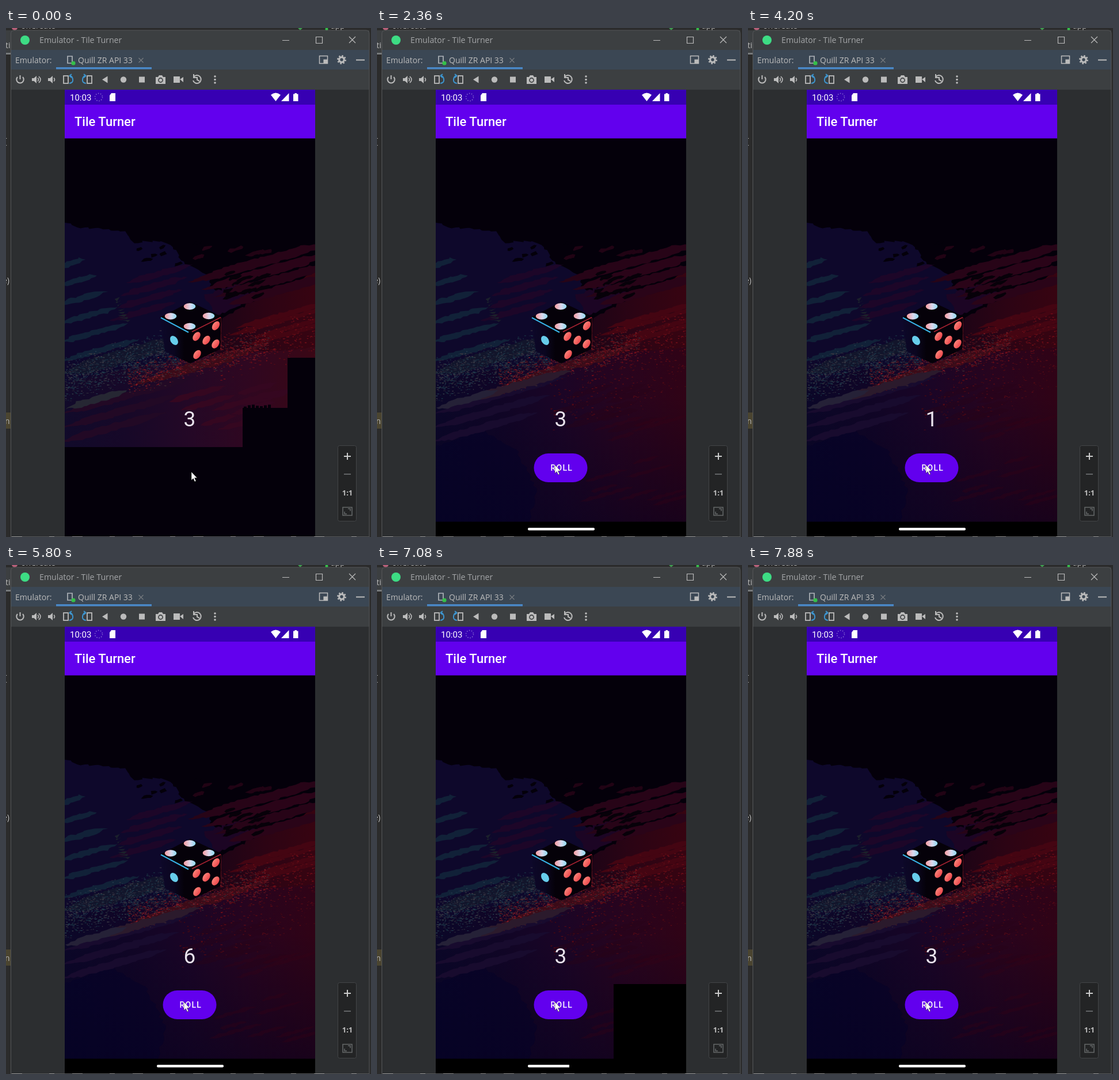
Recreate the animation shown at these times as an HTML page with a canvas. Size 634 by 883 pixels, loop 8 s.

```html
<!DOCTYPE html>
<html lang="en">
<head>
<meta charset="utf-8">
<title>Emulator</title>
<style>
  html, body { margin: 0; width: 100%; height: 100%; overflow: hidden; background: #2b2b2b; }
  canvas, svg { position: absolute; left: 0; top: 0; display: block; }
  canvas { left: 102px; top: 191px; }
  .ui { font-family: "Open Sans", "Noto Sans", sans-serif; font-size: 14px; fill: #bbb; }
  .app { font-family: Roboto, sans-serif; fill: #fff; }
  .digit { font-size: 37px; text-anchor: middle; fill: #e9e3ec; }
  .timed { animation: 8s step-end infinite; }
  .early { animation-name: early; }
  .late { animation-name: late; }
  .stale { animation-name: stale; }
  .trail { animation-name: trail; }
  .cursor { animation-name: cursor; }
  .three { animation-name: three; }
  .six { animation-name: six; }
  .one { animation-name: one; }
  .two { animation-name: two; }
  @keyframes early { 0% { opacity: 1 } 29.5%, 100% { opacity: 0 } }
  @keyframes late { 0% { opacity: 0 } 29.5%, 100% { opacity: 1 } }
  @keyframes stale { 0%, 90.25%, 100% { opacity: 0 } 88.5% { opacity: 1 } }
  @keyframes trail { 0%, 29.5%, 100% { opacity: 0 } 10.5% { opacity: 1 } }
  @keyframes three { 0%, 79.375%, 98.5%, 100% { opacity: 1 } 42.5%, 90.25% { opacity: 0 } }
  @keyframes six { 0%, 52.5%, 79.375%, 100% { opacity: 0 } 42.5%, 72.5% { opacity: 1 } }
  @keyframes one { 0%, 72.5%, 100% { opacity: 0 } 52.5% { opacity: 1 } }
  @keyframes two { 0%, 98.5%, 100% { opacity: 0 } 90.25% { opacity: 1 } }
  @keyframes cursor {
    0% { transform: translate(322px, 770px) }
    7.125% { transform: translate(318px, 767px) }
    8.625% { transform: translate(314px, 763px) }
    10.5% { transform: translate(309px, 760px) }
    29.5%, 100% { transform: translate(309px, 758px) }
  }
</style>
</head>
<body>
<canvas id="lateScene" width="435" height="692"></canvas>
<canvas id="earlyScene" class="timed early" width="435" height="692"></canvas>

<svg width="634" height="883" viewBox="0 0 634 883">
  <defs>
    <linearGradient id="pip"><stop offset=".1" stop-color="#f3a5ad"/><stop offset=".55" stop-color="#d9d9ee"/><stop offset="1" stop-color="#8edcf6"/></linearGradient>
    <linearGradient id="redPip"><stop offset="0" stop-color="#ff8278"/><stop offset="1" stop-color="#e9474c"/></linearGradient>
    <linearGradient id="leftFace"><stop offset="0" stop-color="#0d0829"/><stop offset=".45" stop-color="#0b0620"/><stop offset=".8" stop-color="#050109"/></linearGradient>
    <ellipse id="topPip" rx="10.3" ry="5.8" fill="url(#pip)"/>
    <ellipse id="sidePip" rx="5.6" ry="8.6" transform="rotate(35)" fill="url(#redPip)"/>
    <g id="speaker"><path d="M-7 -2.5h3.500l4.500-4v13l-4.500-4h-3.500z" fill="#bbb"/><path d="M3 -3q3 3 0 6" fill="none" stroke="#bbb" stroke-width="1.600"/></g>
    <g id="turn"><rect x="-8" y="-6" width="8" height="13" fill="none" stroke="#bbb" stroke-width="1.800"/><path d="M2 7q7-1 6-7t-5-6m-1 0l4-3m-4 3l4 3" fill="none" stroke="#3d95cf" stroke-width="2"/></g>
  </defs>

  <!-- editor showing around the window -->
  <path d="M0 0H634V4H0zM0 0H8V883H0zM631 0h3v883h-3z" fill="#2b2b2b"/>
  <path d="M0 4h8v39H0z" fill="#3c3f41"/>
  <path d="M0 43h8v3H0z" fill="#777a7c"/>
  <path d="M0 667h8v28H0z" fill="#4b4530"/>
  <circle cx="15" cy="-1" r="5" fill="#b8607a"/>
  <path d="M507 0h8l-4 4z" fill="#3f9b4f"/>
  <circle cx="557" cy="2" r="2.500" fill="#35c04a"/>
  <g class="ui">
    <svg width="634" height="4"><text x="26" y="1">onCreate</text><text x="564" y="1">app</text></svg>
    <svg width="8" height="883"><text x="-1" y="35">ti</text><text x="-3" y="201">[</text><text x="-6" y="443">e)</text><text x="-2" y="687">n</text></svg>
  </g>

  <!-- window frame -->
  <path d="M8 4H631V38H8zM8 72H631V107H8z" fill="#3c3f41"/>
  <path d="M8 38H631V72H8z" fill="#3b4754"/>
  <path d="M8 107H102V883H8zM537 107H631V883H537z" fill="#2c2e30"/>
  <path d="M8.500 883V10q0-6 6-6H625q6 0 6 6V883" fill="none" stroke="#555759"/>
  <path d="M8 882.500H631" stroke="#555759"/>
  <path d="M10 882.500H631" stroke="#999" stroke-dasharray="18 47 9 31"/>
  <path d="M87 68H253V71.500H87z" fill="#4a88c7"/>
  <circle cx="33" cy="21" r="8" fill="#3ddc84"/>
  <g class="ui">
    <text x="58" y="26" font-size="14.200" fill="#a4a6a8">Emulator - Tile Turner</text>
    <text x="16" y="61">Emulator:</text>
    <text x="125" y="61">Quill ZR API 33</text>
  </g>
  <g fill="none" stroke="#bbb" stroke-width="1.200">
    <path d="M480 21.500h12M538.500 15.500h11v11h-11zM596 15l11 11m0-11l-11 11"/>
    <path d="M230.500 52l8 8m0-8l-8 8" stroke="#777b7f"/>
    <path d="M107 49h8v12h-8z" stroke="#aeb3b8" stroke-width="1.700"/>
    <circle cx="117" cy="61" r="3" fill="#35c04a" stroke="#35c04a"/>
    <path d="M544.500 48.500h14v13h-14z" stroke-width="1.500"/><path d="M552 55h6v6h-6z" fill="#bbb"/>
    <circle cx="583" cy="55" r="4.300" stroke-width="3.200"/>
    <circle cx="583" cy="55" r="6.700" stroke-width="2.400" stroke-dasharray="2.630"/>
    <path d="M608 55.500h15" stroke-width="2"/>
  </g>

  <!-- toolbar -->
  <g fill="none" stroke="#bbb" stroke-width="2">
    <path d="M20 85a6.200 6.200 0 1 0 9 0M24.500 82v7"/>
    <path d="M326 85a7 7 0 1 1-1 6m1-11v6h6M332 85v5l4 2"/>
  </g>
  <use href="#speaker" x="52" y="89.500"/><path d="M57 84q6 5.500 0 11" fill="none" stroke="#bbb" stroke-width="1.600"/>
  <use href="#speaker" x="80" y="89.500"/>
  <use href="#turn" x="108" y="89"/>
  <use href="#turn" transform="translate(141 89) scale(-1 1)"/>
  <g fill="#bbb">
    <path d="M167 89.500l9.500-6v12zM231 84.500h10v10h-10z"/>
    <circle cx="204" cy="89.500" r="5.200"/>
    <path d="M260 85h4l2-3h5l2 3h4v12h-17zM291 84h11v11h-11zM302 89l6-4v9z"/>
    <circle cx="268.500" cy="90.500" r="3.600" fill="#bbb" stroke="#3c3f41" stroke-width="1.600"/>
    <circle cx="363" cy="84" r="1.800"/><circle cx="363" cy="89.500" r="1.800"/><circle cx="363" cy="95" r="1.800"/>
  </g>

  <!-- zoom panel -->
  <rect x="576.500" y="724.500" width="32" height="131" rx="3" fill="#232425" stroke="#434547"/>
  <path d="M587 743h12m-6-6v12" stroke="#ccc" stroke-width="2"/>
  <path d="M587 774h12" stroke="#626466" stroke-width="2"/>
  <text class="ui" x="593" y="811" style="font-size:13px" font-weight="700" text-anchor="middle" fill="#ccc">1:1</text>
  <path d="M585 831.500h16v14h-16zM588 839v4h4m2-9h4v4" fill="none" stroke="#666869" stroke-width="1.500"/>

  <!-- phone bars -->
  <path d="M102 107H537V133H102z" fill="#3700b3"/>
  <path d="M102 133H537V191.500H102z" fill="#6200ee"/>
  <g class="app">
    <text x="111" y="126" font-size="15">10:03</text>
    <text x="119" y="170" font-size="22" font-weight="500">Tile Turner</text>
    <circle cx="161" cy="120" r="6.500" fill="none" stroke="#8a70d4" stroke-width="1.500" stroke-dasharray="1.500 2.600"/>
    <path d="M183 113h7v14h-10v-10zM460 116q8.500-7 17 0l-8.500 11zM478 127l13.500-14v14zM499 114.500h2.500v-1.500h3.500v1.500h2.500v12.500h-8.500z"/>
  </g>

  <!-- die -->
  <path d="M268 502L320 528V582L276 561z" fill="url(#leftFace)"/>
  <path d="M320 475L373 500L372 557L320 582V528L268 502z" fill="#050109"/>
  <path d="M269 502.500L317 528" stroke="#38b5e8" stroke-width="2"/>
  <path d="M323 527L373 502" stroke="#a92332" stroke-width="1.600"/>
  <path d="M373.500 502V554" stroke="#571019"/>
  <use href="#topPip" x="319" y="483"/><use href="#topPip" x="286" y="500"/>
  <use href="#topPip" x="352" y="499.500"/><use href="#topPip" x="319" y="517.500"/>
  <ellipse cx="292" cy="542" rx="6" ry="8.700" transform="rotate(-35 292 542)" fill="#67cdeb"/>
  <use href="#sidePip" x="364.500" y="516.500"/><use href="#sidePip" x="331" y="535"/>
  <use href="#sidePip" x="348" y="541.500"/><use href="#sidePip" x="364" y="548"/><use href="#sidePip" x="332" y="566.500"/>

  <g class="app digit">
    <text class="timed three" x="319" y="691">3</text>
    <text class="timed six" x="319" y="691" opacity="0">6</text>
    <text class="timed one" x="319" y="691" opacity="0">1</text>
    <text class="timed two" x="319" y="691" opacity="0">2</text>
  </g>

  <g class="timed late">
    <path d="M102 856.500H537V882H102z" fill="#000"/>
    <rect x="262" y="867" width="116" height="4.500" rx="2" fill="#fff"/>
    <rect x="272.500" y="738" width="93" height="50" rx="25" fill="#6200ee"/>
    <text class="app" x="301.500" y="768" font-size="14" font-weight="500" letter-spacing="1.250">ROLL</text>
  </g>
  <path class="timed stale" d="M411 727H537V872H411zM334 860H411V873H334z" fill="#000"/>
  <path class="timed trail" d="M309 760H332V786H309z" fill="#000"/>
  <path class="timed cursor" d="M0 0V14.500L3.300 11.500L5.700 17L8 16L5.600 10.500H10z" fill="#fff" stroke="#111" stroke-width=".5"/>
</svg>

<script>
const SLOPE = -0.28;
let seed, ctx;
const rand = () => (seed = (seed * 16807) % 2147483647) / 2147483647;
const between = (a, b) => a + (b - a) * rand();

// Fills a polygon with torn edges
function rough(points, color, amount = 4) {
  ctx.fillStyle = color;
  ctx.beginPath();
  points.forEach(([x, y], i) => {
    const [nx, ny] = points[(i + 1) % points.length];
    const steps = Math.max(1, Math.round(Math.hypot(nx - x, ny - y) / 6));
    for (let k = 0; k < steps; k++) {
      const t = k / steps;
      ctx.lineTo(x + (nx - x) * t + between(-amount, amount), y + (ny - y) * t + between(-amount, amount) / 2);
    }
  });
  ctx.fill();
}

// A tapered dry brush stroke rising to the right
function brush(x, y, length, width, color) {
  const dy = length * SLOPE;
  rough([[x, y], [x + length * .2, y + dy * .2 - width / 2], [x + length * .8, y + dy * .8 - width / 2],
    [x + length, y + dy], [x + length * .8, y + dy * .8 + width / 2], [x + length * .2, y + dy * .2 + width / 2]], color, 2.5);
}

function speckle(count, x0, x1, y0, spread, colors) {
  for (let i = 0; i < count; i++) {
    const x = between(x0, x1);
    const y = y0 + (x - x0) * SLOPE + (rand() + rand() - 1) * spread;
    ctx.fillStyle = colors[i % colors.length];
    ctx.fillRect(x, y, between(1, 4), between(.7, 1.7));
  }
}

function ramp(x0, x1, ...colors) {
  const g = ctx.createLinearGradient(x0, 0, x1, 0);
  colors.forEach((c, i) => g.addColorStop(i / (colors.length - 1), c));
  return g;
}

function upper() {
  rough([[95, 335], [128, 346], [165, 348], [205, 354], [222, 372], [268, 369], [292, 382], [302, 403], [338, 424],
    [360, 430], [352, 450], [385, 462], [370, 500], [330, 600], [95, 640]], '#0e082b');
  rough([[345, 462], [400, 445], [440, 460], [390, 490], [365, 500]], '#1c0524');
  rough([[372, 505], [420, 480], [545, 420], [545, 600], [300, 620], [372, 555]], ramp(360, 537, '#1c0416', '#2c0414', '#370411'));

  for (let i = 0; i < 6; i++) brush(92, 414 + i * 33, 46 + i * 19, 10, '#112138');
  for (let i = 0; i < 4; i++) brush(180 + i * 10, 508 - i * 22, 115, 11, '#1d0628');
  for (let i = 0; i < 9; i++) rough([[188 + i * 3, 470 + i * 5], [198 + i * 2, 467 + i * 5], [194, 474 + i * 4]], '#1b202c', 2);
  for (let i = 0; i < 4; i++) brush(318 + i * 22, 441 + i * 13, 245 - i * 22, 17, i % 2 ? '#2a0418' : '#270417');
  for (let i = 0; i < 4; i++) brush(380 + i * 14, 535 + i * 9 - (i % 2) * 22, 175, 9, '#440512');
  for (let i = 0; i < 14; i++) brush(between(370, 440), between(425, 482), between(12, 38), 6, '#070109');
  for (let i = 0; i < 9; i++) brush(between(320, 450), between(382, 402), between(10, 32), 6, '#210314');
  for (let i = 0; i < 7; i++) brush(between(220, 330), between(375, 412), between(8, 18), 5, '#04000a');
}

function lower(late) {
  const edge = [[95, 617], [210, 590], [290, 577], [375, 565], [545, 555]];
  const tones = late ? ['#0b0728', '#100526', '#1b0526', '#28041e', '#300316'] : ['#110a2a', '#170828', '#240826', '#300720', '#3a0715'];
  rough([...edge, [545, 900], [95, 900]], ramp(102, 537, ...tones));
  if (late) {
    const shade = ctx.createLinearGradient(0, 640, 0, 857);
    shade.addColorStop(0, '#07021e00');
    shade.addColorStop(1, '#07021e90');
    ctx.fillStyle = shade;
    ctx.fillRect(102, 640, 435, 220);
    rough([[95, 730], [180, 695], [245, 735], [275, 800], [265, 860], [95, 860]], '#05032880');
  }
  for (let i = 0; i < 3; i++) brush(95, 670 + i * 24, 235 - i * 25, 13, late ? '#180b2e' : '#220925');
  for (let i = 0; i < 8; i++) brush(between(280, 410), between(625, 710), between(60, 130), 10, late ? '#27031870' : '#350720');
  if (late) for (let i = 0; i < 12; i++) brush(between(350, 480), between(675, 830), between(40, 110), 6, '#37031650');
}

function texture(late) {
  brush(95, 600, 235, 25, '#12152b');
  rough([[215, 620], [310, 585], [385, 562], [460, 545], [385, 580], [290, 607]], '#3b0b18', 3);
  speckle(1200, 102, 300, 610, 42, ['#23394b', '#183243', '#393843', '#242235']);
  speckle(950, 210, 455, 613, 30, ['#64151f', '#851b25', '#41101f', '#382630']);
  speckle(320, 370, 537, 572, 48, ['#5a0b15', '#730e18']);
  if (late) {
    speckle(250, 300, 537, 650, 65, ['#430814', '#550a16']);
    brush(150, 647, 190, 14, '#2b1a2c');
  }
  brush(102, 660, 110, 12, late ? '#252137' : '#262733');
}

function paint(id, late) {
  ctx = document.getElementById(id).getContext('2d');
  ctx.translate(-102, -191);
  seed = 4711;
  ctx.fillStyle = '#04000a';
  ctx.fillRect(102, 191, 435, 692);
  upper();
  seed = 2027;
  lower(late);
  seed = 977;
  texture(late);
  if (late) return;
  ctx.fillStyle = '#04000a';
  ctx.fillRect(489, 572, 48, 320);
  ctx.fillRect(411, 659, 126, 220);
  ctx.fillRect(102, 727, 435, 160);
  for (let x = 413; x < 460; x += 7) ctx.fillRect(x, 659 - between(1, 6), 5, 7);
}

paint('lateScene', true);
paint('earlyScene', false);
</script>
</body>
</html>
```
